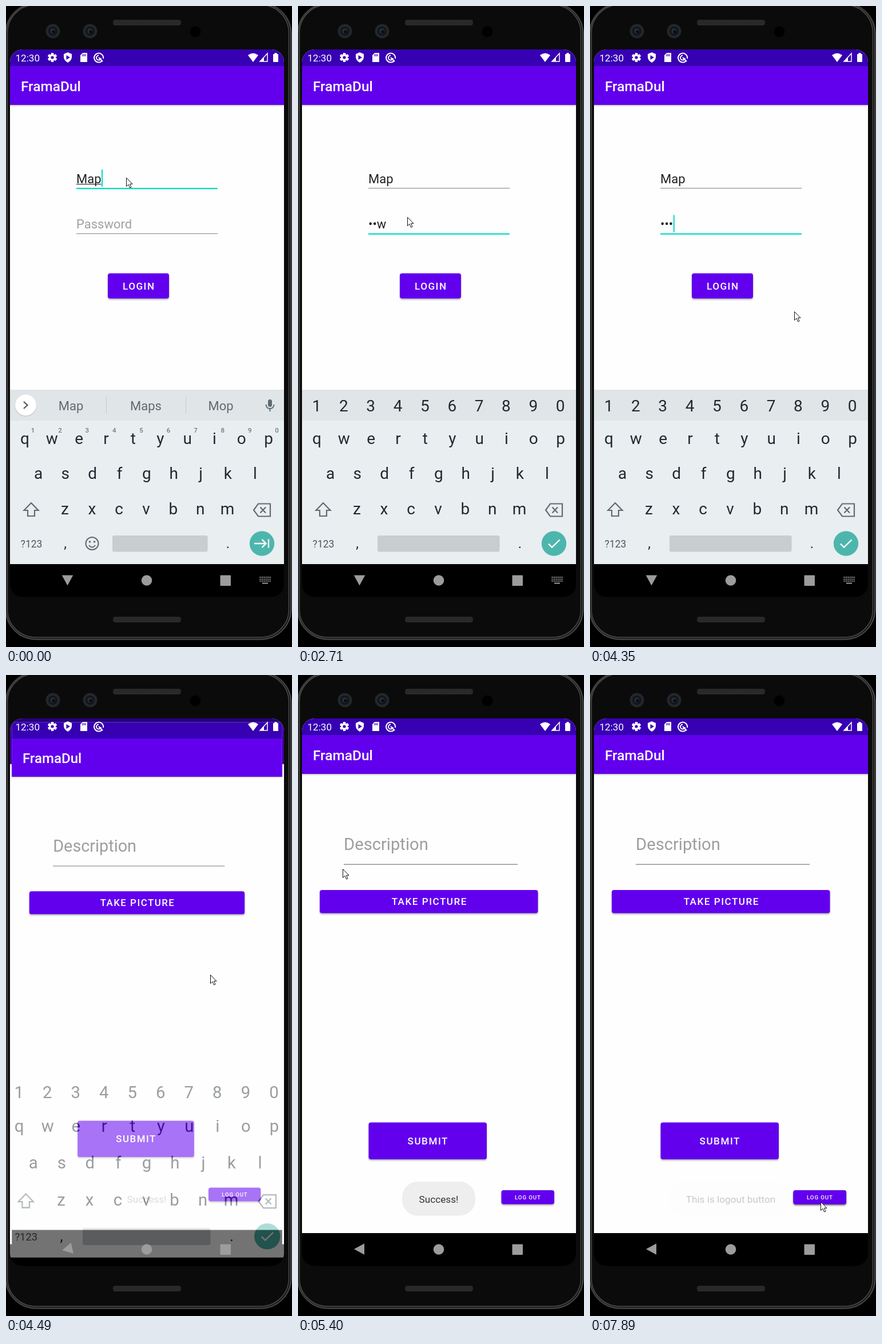
These frames come from a looping animation (500 px wide and 1121 px high, 8000 ms). An HTML page with a canvas:

```html
<!DOCTYPE html>
<html lang="en">
<head>
<meta charset="utf-8">
<title>Login demo</title>
<style>
html, body { margin: 0; width: 100%; height: 100%; overflow: hidden; background: #000; }
canvas { display: block; }
</style>
</head>
<body>
<canvas id="stage" width="500" height="1121"></canvas>
<script>
const W = 500, H = 1121, LOOP = 8000;
const PURPLE = '#6200ee', TEAL = '#03dac5', INK = '#1f2a30', GREY = '#9c9c9c', PAPER = '#fefefe';
const stage = document.getElementById('stage').getContext('2d');
const keyCanvas = Object.assign(document.createElement('canvas'), { width: W, height: H });
const keyLayer = keyCanvas.getContext('2d');
let c = stage;

// Stepped tracks: each row holds from its time until the next row.
const MOUSE = [
  [0, 210, 300], [260, 210, 304], [380, 208, 318], [500, 201, 336], [650, 194, 365], [770, 191, 381],
  [1050, 191, 375], [1170, 191, 369], [2960, 228, 405], [3080, 276, 453], [3230, 272, 462],
  [3740, 288, 480], [3860, 318, 505], [3980, 345, 526], [4100, 357, 534],
  [4490, 357, 524], [5120, 312, 443], [5270, 170, 158], [5400, 78, 339], [5520, 95, 430],
  [5640, 140, 590], [5760, 215, 760], [5880, 277, 868], [6030, 262, 781],
  [6270, 256, 827], [6410, 257, 888], [6560, 290, 915], [6680, 340, 922], [6800, 385, 920],
  [6920, 401, 918], [7070, 402, 919], [7580, 403, 921]
];
const PASSWORD = [[0, ''], [1940, 's'], [2190, '•a'], [2310, '••w'], [3740, '•••']];
// Times at which the caret toggles, starting from visible.
const BLINKS = [260, 770, 1050, 1170, 1570, 1940, 2710, 3230, 3740, 4350];
const TOAST = [[0, 0], [4490, .3], [4610, .75], [4730, 1], [6030, .75], [6150, .55], [6270, .35],
  [6410, .13], [6560, 0], [7890, .25]];
// time, entering scale, leaving scale, keyboard alpha, keyboard drop, back arrow angle
const OPEN = [[4490, .9867, 1.046, .45, 24, -12], [4610, .998, 1.07, .1, 40, 0], [4730, 1, 1, 0, 0, 0]];

const at = (rows, t) => rows.findLast(r => r[0] <= t);
const caretOn = t => BLINKS.filter(b => b <= t).length % 2 === 0;

function box(x, y, w, h, r, fill) {
  c.fillStyle = fill;
  c.beginPath();
  c.roundRect(x, y, w, h, r);
  c.fill();
}
function rim(x, y, w, h, r, color, width) {
  c.strokeStyle = color;
  c.lineWidth = width;
  c.beginPath();
  c.roundRect(x, y, w, h, r);
  c.stroke();
}
function disc(x, y, r, fill) {
  c.fillStyle = fill;
  c.beginPath();
  c.arc(x, y, r, 0, 7);
  c.fill();
}
function shape(d, fill, stroke, width = 2) {
  const p = Reflect.construct(Path2D, [d]);
  if (fill) { c.fillStyle = fill; c.fill(p); }
  if (stroke) { c.strokeStyle = stroke; c.lineWidth = width; c.stroke(p); }
}
function text(s, x, y, size, fill, align = 'left', weight = 400, space = 0) {
  c.font = `${weight} ${size}px Roboto, sans-serif`;
  c.textAlign = align;
  c.letterSpacing = space + 'px';
  c.fillStyle = fill;
  c.fillText(s, x + (align === 'center' ? space / 2 : 0), y);
  return c.measureText(s).width;
}
function layer(scale, drop, draw) {
  c.save();
  c.translate(246.5, 554.5 + drop);
  c.scale(scale, scale);
  c.translate(-246.5, -554.5);
  draw();
  c.restore();
}
function button(label, x, y, w, h, size, mid, fill = PURPLE) {
  c.save();
  c.shadowColor = 'rgba(0,0,0,.3)';
  c.shadowBlur = 3;
  c.shadowOffsetY = 2;
  box(x, y, w, h, 4, fill);
  c.restore();
  text(label, mid, y + h / 2 + size * .36, size, '#fff', 'center', 500, size * .089);
}

function phone() {
  c.fillStyle = '#000';
  c.fillRect(0, 0, W, H);
  box(0, -5, 498, 1113, 52, '#0b0b0b');
  rim(0, -4, 498, 1111, 52, '#2c2c2c', 3);
  rim(2.5, -2, 492, 1106, 49, '#4c4c4c', 1.5);
  rim(-.5, -5, 499, 1113, 53, '#5c5c5c', 1);
  for (const y of [24, 1068]) {
    box(187, y, 119, 10, 4, '#272727');
    c.fillStyle = '#3a3a3a';
    for (let i = 0; i < 112; i += 3) for (let j = 2; j < 9; j += 3) c.fillRect(190 + i, y + j, 1, 1);
  }
  for (const x of [82, 147]) {
    disc(x, 44, 12.5, '#23272c');
    disc(x, 44, 8, '#11161c');
    disc(x, 44, 4.5, '#2b333b');
    disc(x + 1, 45, 3, '#0b0e12');
  }
  disc(331, 45, 9.5, '#000');
}

function statusIcons() {
  text('12:30', 16.5, 97, 17.1, '#fff');
  c.save();
  c.translate(81, 90);
  for (let i = 0; i < 6; i++) { c.rotate(Math.PI / 3); box(-2.2, -8, 4.4, 16, 1, '#fff'); }
  c.restore();
  disc(81, 90, 5.8, '#fff');
  disc(81, 90, 2.6, '#3700b3');
  shape('M108 81L115 84V90Q114 96 108 99Q102 96 101 90V84Z', '#fff');
  shape('M105.5 86L112 90L105.5 94Z', '#3700b3');
  shape('M134 82H142V98H130V86Z', '#fff');
  shape('M134 84V88M136.5 84V88M139 84V88', null, '#3700b3', 1.2);
  shape('M168 96A8 8 0 1 1 170 92M166 91A4 4 0 1 1 162 86.5M162 90L169 97', null, '#fff', 2);
  shape('M423 86Q432 79 441 86L432 98Z', '#fff');
  shape('M457 83V97H444Z', null, '#fff', 1.5);
  shape('M451 90V97H444Z', '#fff');
  box(467, 84, 9, 14, 1, '#fff');
  box(469.5, 82, 4, 3, 0, '#fff');
}

function appFrame() {
  box(7, 76, 479, 900, 0, PAPER);
  c.save();
  c.shadowColor = 'rgba(0,0,0,.3)';
  c.shadowBlur = 3;
  c.shadowOffsetY = 1;
  box(7, 104, 479, 69, 0, PURPLE);
  c.restore();
  box(7, 76, 479, 29, 0, '#3700b3');
  text('FramaDul', 26, 148.5, 24.4, '#fff', 'left', 500);
}

function field(y, value, hint, focused, caret) {
  const w = text(value || hint, 123, y - 9.5, 22, value ? '#212121' : '#a0a0a0');
  if (focused) box(123, y - 1, 247, 2.3, 0, TEAL);
  else box(123, y - 1, 247, 1.2, 0, '#949494');
  if (caret) box((value ? 123 + w : 123) + .5, y - 33, 2, 30, 0, TEAL);
  return w;
}

function loginScreen(t) {
  appFrame();
  const second = t >= 1050, caret = caretOn(t);
  const w = field(319, 'Map', '', !second, !second && caret);
  if (!second) box(123, 311, w, 1.2, 0, '#333');
  field(398.5, at(PASSWORD, t)[1], 'Password', second, second && t >= 1170 && caret);
  button('LOGIN', 178, 467.5, 107, 44, 17.1, 231.5);
}

function logout(t) {
  const pressed = t >= 7440 && t < 7580;
  button('LOG OUT', 355.5, 901, 92.5, 24.5, 9.75, 401.5, pressed ? '#8133f1' : PURPLE);
}

function postScreen(t) {
  appFrame();
  text('Description', 80, 306, 29.2, '#9e9e9e');
  box(80, 330.5, 304, 1.4, 0, '#949494');
  button('TAKE PICTURE', 38, 376, 381.5, 40.5, 17.1, 229);
  button('SUBMIT', 123.5, 782.5, 206.5, 64.5, 17.1, 226.5);
  logout(t);
}

// The plate is far fainter than its label while fading.
function toast(t) {
  const first = t < 7000, w = first ? 128 : 216, alpha = at(TOAST, t)[1];
  if (!alpha) return;
  c.globalAlpha = alpha * alpha;
  box(246 - w / 2, 886, w, 59.5, 27, '#eee');
  c.globalAlpha = alpha;
  text(first ? 'Success!' : 'This is logout button', 246, 923, 17.2, '#333', 'center');
  c.globalAlpha = 1;
}

function keyboard(t) {
  const secret = t >= 1050, plain = t >= 4490, soft = '#5f6b71';
  box(7, 671, 479, 304.5, 0, plain ? PAPER : '#e9eef1');
  if (!plain) box(7, 671, 479, 54, 0, '#e0e5e8');
  const row = (keys, x, y) => [...keys].forEach((k, i) => text(k, x + i * 47.35, y, 28, INK, 'center'));
  row('qwertyuiop', 33, 765.5);
  row('asdfghjkl', 56.5, 826.5);
  row('zxcvbnm', 103, 888.5);
  if (secret) row('1234567890', 32.5, 709);
  else {
    [...'1234567890'].forEach((k, i) => text(k, 47 + i * 47.4, 746, 11.5, '#6f797e', 'center', 500));
    disc(34.5, 699, 19, 'rgba(0,0,0,.12)');
    disc(34.5, 698, 18.5, '#fff');
    shape('M31 692L37.5 698L31 704', null, '#555', 2.2);
    ['Map', 'Maps', 'Mop'].forEach((s, i) => text(s, 113.5 + i * 131, 707, 22, soft, 'center'));
    for (const x of [175, 314]) box(x, 683, 1, 30, 0, '#c3c9cc');
    box(458, 688, 7, 13, 3.5, soft);
    shape('M454.5 697Q455 704 461.5 704Q468 704 468.5 697M461.5 704V709', null, soft);
    rim(139.5, 929, 22, 22, 11, soft, 2);
    disc(146.5, 937, 1.8, soft);
    disc(154.5, 937, 1.8, soft);
    shape('M145 943Q150.5 950 156 943', null, soft);
  }
  shape('M44 869L56.5 882H50V892H38V882H31.5Z', null, soft, 2.2);
  shape('M441 870.5H462V892.5H441L433 881.5Z', null, soft, 2.2);
  shape('M444.5 876.5L454 886.5M454 876.5L444.5 886.5', null, soft, 2.2);
  text('?123', 44.5, 946.5, 17.5, '#4c585e', 'center');
  text(',', 103.5, 948, 24, INK, 'center');
  text('.', 388, 948, 24, INK, 'center');
  const left = secret ? 139 : 186;
  box(left, 926, 352.5 - left, 28.5, 3, '#c8cdd0');
  disc(447.5, 940, 21.7, '#4db6ac');
  const check = 'M438 940.5L444 946.5L457.5 933.5';
  const next = 'M434 940H454M447.5 933L454.5 940L447.5 947M459 932.5V947.5';
  shape(secret ? check : next, null, '#fff', 2.4);
}

function navIcons(angle, keys) {
  c.save();
  c.translate(107.5, 1004);
  c.rotate(angle * Math.PI / 180);
  shape('M-9.5 0L8.5 -9.8V9.8Z', GREY);
  c.restore();
  disc(246, 1004.5, 9.3, GREY);
  box(374.5, 995.5, 18.5, 18.5, 1, GREY);
  if (!keys) return;
  for (let j = 0; j < 3; j++) for (let i = 0; i < 6; i++) box(443.5 + i * 3.4, 998 + j * 3.4, 2, 2, 0, GREY);
  box(448, 1008.5, 10, 2, 0, GREY);
}

function mouse(t) {
  const [, x, y] = at(MOUSE, t);
  c.save();
  c.translate(x + .5, y + .5);
  shape('M0 0V15L3.5 11.7L6 17.5L8.5 16.5L6 10.8H10.5Z', '#fff', '#111', 1);
  c.restore();
}

function postScene(t) {
  const [, scale, old, alpha, drop, angle] = at(OPEN, t);
  if (alpha) {
    layer(old, 0, () => loginScreen(t));
    box(7, 76, 479, 80, 0, 'rgba(0,0,0,.3)');
  }
  layer(scale, 0, () => {
    if (alpha) box(7, 975, 479, 58, 0, '#000');
    postScreen(t);
  });
  toast(t);
  if (t > 7000) logout(t);
  if (alpha) {
    c = keyLayer;
    c.clearRect(0, 0, W, H);
    layer(old, drop, () => keyboard(t));
    c = stage;
    c.globalAlpha = alpha;
    c.drawImage(keyCanvas, 0, 0);
    c.globalAlpha = 1;
  }
  return angle;
}

function draw(t) {
  const typing = t < 4490;
  let angle = -90;
  phone();
  c.save();
  c.beginPath();
  c.roundRect(7, 76, 479, 957.5, 22);
  c.clip();
  box(7, 76, 479, 958, 0, '#000');
  if (typing) {
    loginScreen(t);
    keyboard(t);
  } else angle = postScene(t);
  statusIcons();
  navIcons(angle, typing);
  c.restore();
  mouse(t);
}

function tick() {
  draw(performance.now() % LOOP);
  requestAnimationFrame(tick);
}
tick();
</script>
</body>
</html>
```
